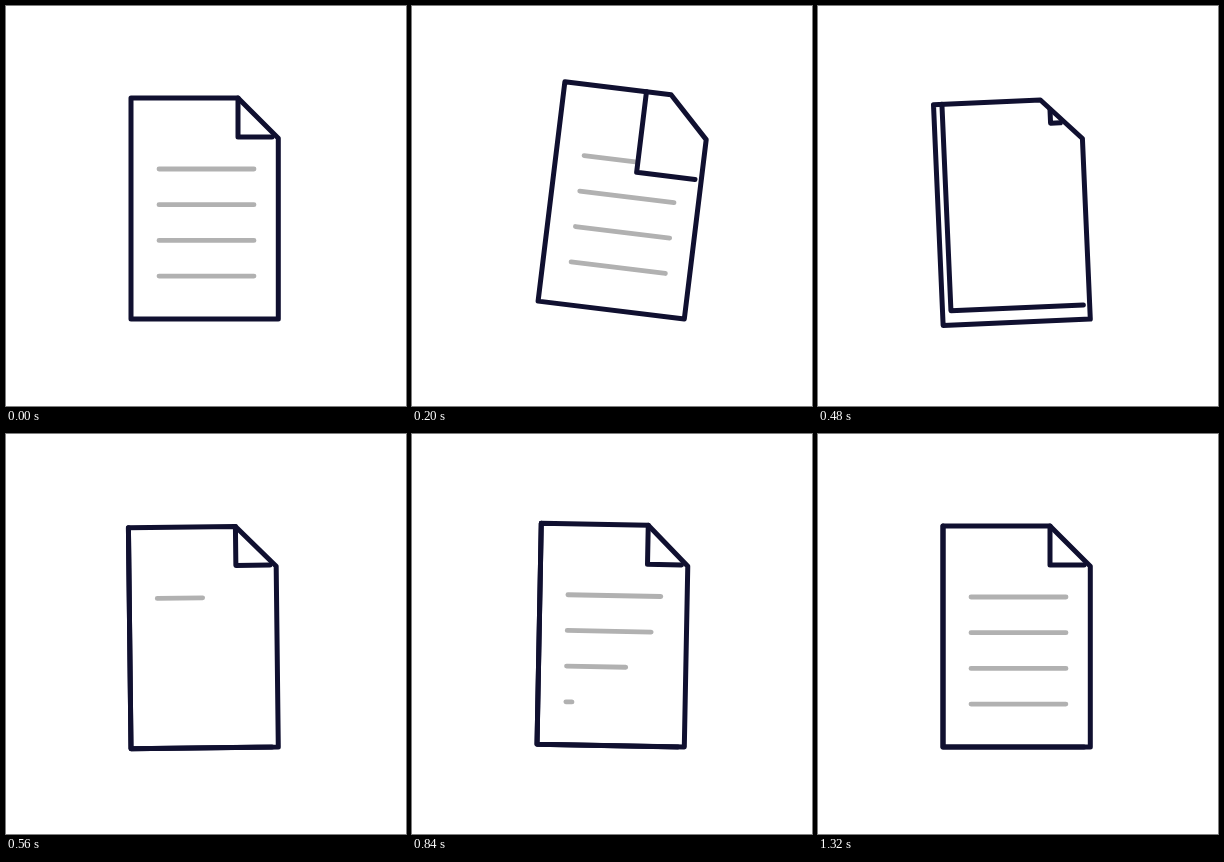
Animation, 400 px wide and 400 px high, one loop 1960 ms. Source, as an HTML page:

```html
<!DOCTYPE html>
<html lang="en">
<head>
<meta charset="utf-8">
<title>Page turn</title>
<style>
  html, body { margin: 0; height: 100%; overflow: hidden; background: #fff; }
  svg { display: block; width: 100%; height: 100%; }
  path { fill: none; stroke: #101030; stroke-width: 5; stroke-linecap: round; stroke-linejoin: round; }
  #lines { stroke: #b1b1b1; stroke-width: 4.8; }
  #cover { fill: #fff; stroke: none; }
</style>
</head>
<body>
<svg viewBox="0 0 400 400">
  <g id="page">
    <path id="lines"/>
    <path id="cover"/>
    <path id="sheet"/>
    <path id="fold"/>
    <path d="M125 92H232L272.3 132.3V313H125Z"/>
  </g>
</svg>
<script>
const LOOP = 1960, STEP = 40;
const LINES_START = 470, LINE_DELAY = 120, LINE_TIME = 600;
const LINE_LEFT = 153, LINE_LENGTH = 95;
const SWAP = 500; // the turning sheet hides the old lines by now

const $ = id => document.getElementById(id);
const mix = (a, b, p) => a + (b - a) * p;
const span = (t, from, to) => Math.min(1, Math.max(0, (t - from) / (to - from)));
const easeOut = (u, power) => 1 - (1 - u) ** power;
const sine = u => (1 - Math.cos(Math.PI * u)) / 2;
const soft = u => (u + u * u * (3 - 2 * u)) / 2;

function tilt(t) {
  if (t < 228) return 7 * easeOut(span(t, 0, 228), 2.5);
  if (t < 420) return mix(7, -3, sine(span(t, 228, 420)));
  if (t < 720) return mix(-3, 2.2, sine(span(t, 420, 720)));
  return mix(2.2, 0, sine(span(t, 720, 960)));
}

function linesPath(t) {
  let d = '';
  for (let i = 0; i < 4; i++) {
    const start = LINES_START + i * LINE_DELAY;
    const grown = t < SWAP ? 1 : easeOut(span(t, start, start + LINE_TIME), 4);
    if (grown > 0) d += `M${LINE_LEFT} ${163 + i * 35.7}h${LINE_LENGTH * grown}`;
  }
  return d;
}

function foldPath(t) {
  if (t <= 430) return '';
  const p = sine(span(t, 430, 555));
  const x = mix(246, 232, p), y = mix(107.5, 131, p);
  return `M${x} ${mix(107, 92, p)}V${y}H${mix(243, 266, p)}`;
}

function draw(t) {
  const turn = soft(span(t, 72, 535));
  const x = mix(232, 125, turn), y = mix(131, 313, turn);
  const edge = `M${x} 92V${y}H266`;
  $('page').setAttribute('transform', `rotate(${tilt(t)} 272.3 313)`);
  $('lines').setAttribute('d', linesPath(t));
  $('cover').setAttribute('d', t < SWAP ? edge + 'V126L232 92Z' : '');
  $('sheet').setAttribute('d', edge);
  $('fold').setAttribute('d', foldPath(t));
}

const begin = performance.now();
function tick() {
  const t = (performance.now() - begin) % LOOP;
  draw(Math.floor(t / STEP) * STEP);
  requestAnimationFrame(tick);
}
tick();
</script>
</body>
</html>
```
